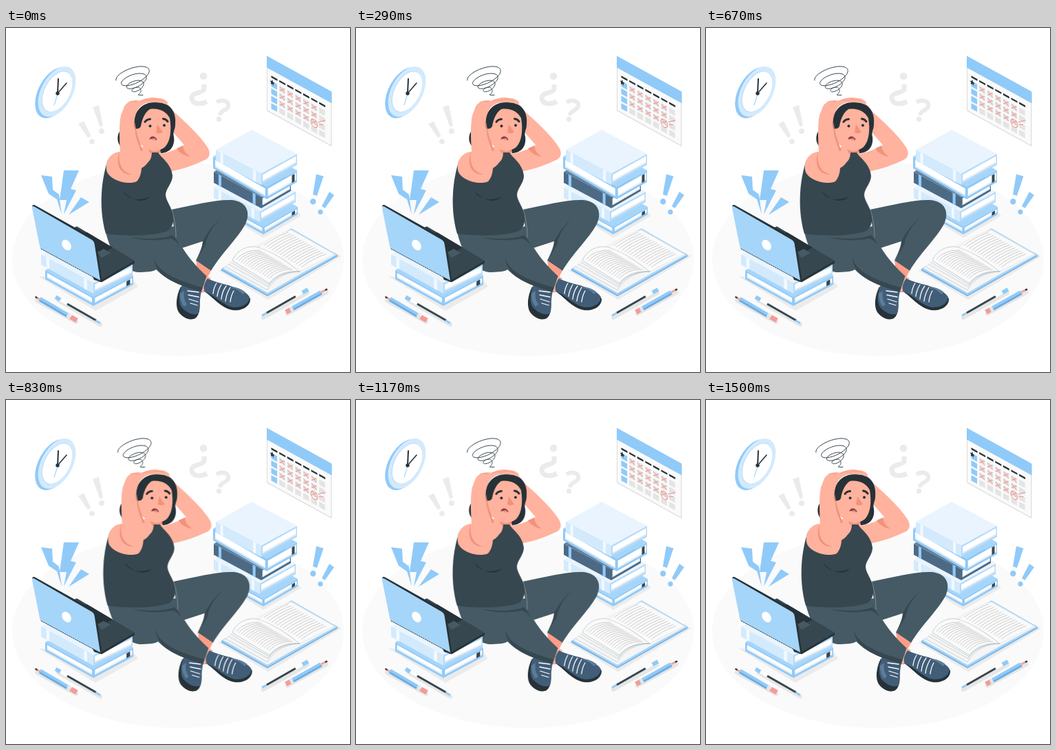
Write an HTML page that moves like this. It is 500 px wide and 500 px high and loops after 1540 ms.

```html
<!DOCTYPE html>
<html lang="en">
<head>
<meta charset="utf-8">
<title>Overwhelmed student</title>
<style>
  html, body { margin: 0; width: 100%; height: 100%; overflow: hidden; background: #fff; }
  svg { display: block; width: 100%; height: 100%; }
  .line { fill: none; stroke-linecap: round; stroke-linejoin: round; }
  .blue { fill: #90caf9; }
  .pale { fill: #d3eafd; }
  .grey { fill: #ebebeb; }
  .shade { fill: #ebebeb; }
  .ink { fill: #263238; }
  .skin { fill: #ffb29d; }
  .blush { fill: #f0937d; }
  .pants { fill: #455a64; }
  .top { fill: #37474f; }
  .shoe { fill: #415d78; }
  #woman {
    animation: shake 1540ms infinite;
    animation-timing-function: cubic-bezier(.36, .07, .19, .97);
  }
  /* the shake takes 1500 ms, then rests until the loop ends */
  @keyframes shake {
    0%, 97.4%, 100% { transform: translateX(0); }
    9.74%, 87.66% { transform: translateX(-1px); }
    19.48%, 77.92% { transform: translateX(2px); }
    29.22%, 48.7%, 68.18% { transform: translateX(-4px); }
    38.96%, 58.44% { transform: translateX(4px); }
  }
</style>
</head>
<body>
<svg viewBox="0 0 500 500">
  <ellipse cx="250" cy="336" rx="241" ry="141" fill="#fafafa"/>

  <g id="clock">
    <g transform="matrix(.83 -.48 0 1 70 94)"><circle r="33.5" class="blue"/></g>
    <g transform="matrix(.83 -.48 0 1 74 92.5)">
      <circle r="33" class="pale"/>
      <circle r="27" fill="#b9ddfb"/>
      <circle cx=".7" cy=".4" r="26.3" fill="#fff"/>
    </g>
    <g class="line" stroke="#263238">
      <path d="M75 95L76 74" stroke-width="2"/>
      <path d="M75 95L88 80" stroke-width="1.6"/>
      <path d="M77 90L70 112" stroke="#90caf9" stroke-width="1"/>
    </g>
    <circle cx="75" cy="95" r="2.700" class="ink"/>
  </g>

  <g class="grey">
    <path d="M105 139.500L113 135.500L123.500 157L119 159.500Z"/><circle cx="125" cy="165" r="3.8"/>
    <path d="M126 115L135 112L141 142L136.500 143.500Z"/><circle cx="139" cy="150" r="4"/>
    <circle cx="287" cy="70" r="5.300"/><circle cx="309.500" cy="132.500" r="3.700"/>
  </g>
  <g class="line" stroke="#ebebeb" style="stroke-linecap:butt">
    <path d="M288 82V89C286 95 271 93 270 101C270 111 282 112 292 107" stroke-width="7"/>
    <path d="M306 108C314 103 325 106 323 114C321 121 312 118 311 127" stroke-width="6"/>
  </g>

  <g class="blue">
    <path d="M51 214L67 216L68 235L77 242L81 271L74 249L62 241Z"/>
    <path d="M84 207H106L94 234L102 236L84 271L88 250L78 250Z"/>
    <path d="M109 246L121 253L91 271.500Z"/>
    <path d="M451 212.500L461.500 215.500L452 244L446 242Z"/><circle cx="446.300" cy="252.300" r="4.200"/>
    <path d="M470 238L477 243L463.500 262L459 259Z"/><circle cx="457" cy="267.300" r="3.600"/>
  </g>

  <g id="calendar" transform="matrix(1 .55 0 1 380 41)">
    <rect x="-1" y=".5" width="94.500" height="79.500" rx="1.500" fill="#dcdcdc"/>
    <rect width="92.300" height="78.500" rx="1" fill="#fafafa"/>
    <path class="blue" d="M-1 1Q-1 0 0 0H92.500Q93.500 0 93.500 1V17H-1Z"/>
    <g id="days"></g>
    <g class="line" stroke="#f0938c" stroke-width="1">
      <ellipse cx="68" cy="60" rx="5" ry="5.500"/><path d="M74 55L84 47M75 58L81 55"/>
    </g>
    <path class="ink" d="M7 30L8 33L10.500 33.300L8.700 35.200L9.200 38L7 36.500L4.800 38L5.300 35.200L3.500 33.300L6 33Z"/>
  </g>

  <path class="shade" d="M304 262L374 305L429 273L420 262Z"/>
  <g id="right-stack"></g>

  <g id="open-book">
    <path class="shade" d="M308 352L381 395L487 332L478 326Z"/>
    <path d="M313 350L415 291.500L482 330V332L380 390L313 352.500Z" fill="#78b4e6"/>
    <path d="M313 350L415 291.500L482 330L380 388Z" fill="#a6d5fa"/>
    <path d="M316 349L368 313L415 293L479 329.500L427 358L380 385Z" fill="#f5f5f5"/>
    <path d="M329 338C336 321 354 315 368 319C390 326 409 341 427 354C408 352 392 359 383 371Z" fill="#fafafa" stroke="#b0bec5" stroke-width=".7"/>
    <path d="M368 319C372 312 390 302 414 293.500L477 328.500L427 354C410 340 390 326 368 319Z" fill="#fafafa" stroke="#cfd8dc" stroke-width=".5"/>
    <path d="M319 347L380 381C388 367 402 355 427 354M323 343L381 376C388 364 404 354 427 354M326 340L382 373C390 361 404 354 427 354" class="line" stroke="#b0bec5" stroke-width=".6"/>
    <g id="print" class="line" stroke="#b8b8b8" stroke-width=".7"></g>
  </g>

  <g id="pencils">
    <path d="M45 396L102 427M76 396L137 431M374 421L438 385M409 415L466 384" class="line" stroke="#e6e6e6" stroke-width="6"/>
    <g id="tools"></g>
  </g>

  <g id="woman">
    <path id="scribble" class="line" stroke="#37474f" stroke-width="1"/>

    <path class="skin" d="M230 108C236 110 239 115 243 121C260 136 280 154 292 172Q300 184 291 191C276 198 258 205 237 209L222 184C238 180 250 176 259 170L240 148Z"/>
    <path d="M248 175Q254 185 268 187Q258 181 257 171Z" class="blush"/>

    <path class="ink" d="M167 148C160 155 161 169 169 174L178 160ZM186 146C184 120 198 107 219 108C238 109 248 120 246 141C246 147 242 151 244 158C246 173 237 183 222 182C208 180 190 168 186 146Z"/>
    <path class="skin" d="M184 180L208 168L224 178L228 190L215 205L195 205Z"/>
    <path d="M206 174Q216 183 225 176L222 184Q210 188 206 174Z" class="blush"/>
    <path class="skin" d="M186 146Q193 148 196 143C198 130 203 122 209 118C222 116 233 121 238 131C241 148 239 165 231 173C223 180 211 179 202 174L190 165Z"/>

    <g class="line" stroke="#263238" stroke-width="3">
      <path d="M202 136.500Q204 133 209.500 132.500M228.500 132Q233 132.500 235 136"/>
    </g>
    <circle cx="209.500" cy="142.500" r="2" class="ink"/><circle cx="230" cy="141.500" r="2" class="ink"/>
    <path d="M220 140L228 151.500Q223 154.500 218 152Z" class="blush"/>
    <path d="M208.500 162C209 156 217 156 219.500 162Q219 164 216 162.500Q212 160.500 208.500 162Z" fill="#8d3f45"/>
    <path d="M212 161.500Q216 158 218.500 162.500Q215 164.500 212 161.500Z" fill="#e58b8b"/>

    <path class="pants" d="M240 264C275 257 305 249 328 250C350 252 356 268 348 285C335 308 315 325 298 353L276 338C282 326 286 315 286 310L249 322Z"/>
    <path d="M286 310Q296 290 312 277Q293 296 290 315L280 333Q286 320 286 310Z" class="top"/>
    <path d="M276 338L298 353L293 362L288 366L270 380L262 374Q281 358 276 338Z" fill="#ff9c85"/>

    <path class="ink" d="M254 376C247 390 246 405 251 413C257 421 267 426 275 422C283 416 282 402 281 393Z"/>
    <path d="M256 373C251 386 250 398 255 406C262 413 272 419 280 415C282 404 281 392 285 379Z" class="shoe"/>
    <path d="M253 386Q253 399 259 405L263 402Q257 393 259 382Z" fill="#5d7c9a"/>
    <path d="M264 382L280 384M265 388L280 391M266 394L279 398M268 400L278 403" class="line" stroke="#fff" stroke-width="1.300"/>

    <path class="pants" d="M145 296C180 299 220 292 245 288C248 312 266 337 292 361L286 384C262 377 230 367 215 347C223 351 217 355 191 355C167 351 151 325 145 296Z"/>
    <path d="M180 304C210 308 230 306 242 301Q249 308 252 316Q246 308 240 306C220 310 198 309 180 304ZM215 332C216 350 240 365 288 378L286 384C258 376 214 364 215 332Z" class="top"/>
    <path class="skin" d="M292 360L298 364L293 372L288 385L284 383Z"/>
    <path d="M241 264Q247 284 247 304" class="line" stroke="#b0bec5" stroke-width=".6" stroke-dasharray="2 1"/>

    <path class="ink" d="M287 382C300 390 312 407 329 410C345 412 356 403 355 393L345 385Z"/>
    <path d="M293 364C288 371 286 378 289 383C304 389 315 403 330 406C344 407 354 400 354 391C349 382 333 378 324 374C312 371 303 369 293 364Z" class="shoe"/>
    <path d="M329 376Q341 378 348 384L344 387Q337 379 328 378Z" fill="#5d7c9a"/>
    <path d="M306 371Q302 377 301 386M313 373Q308 381 307 390M320 375Q314 383 313 394M326 377Q320 387 319 397M331 382Q327 389 326 398" class="line" stroke="#fff" stroke-width="1.300"/>

    <path class="top" d="M148 192C158 205 177 210 190 206C200 204 209 197 211 181L221 181C225 188 241 198 242 215C242 226 232 233 232 243C233 253 242 261 243 275C244 284 241 290 235 295C210 304 165 302 145 299C139 278 138 257 139 240C140 222 144 203 148 192Z"/>
    <path d="M170 237C176 248 192 253 210 245Q193 260 170 237Z" class="ink"/>
    <path class="skin" d="M195 205L212 180Q212 197 197 199Z"/>

    <path class="skin" d="M172 114C176 107 187 103 195 106C204 101 214 100 221 102C230 102 236 107 235 110C224 108 212 107 204 109C192 113 189 122 187 132C185 145 190 163 195 177C199 198 198 215 190 223C177 229 148 221 146 206C144 190 155 180 166 180C165 163 164 141 167 127Z"/>
    <path d="M165 180Q162 200 174 209Q178 212 184 213Q169 214 164 201Q161 190 165 180ZM187 136Q186 156 196 179L199 178Q190 158 187 136Z" class="blush"/>
    <path d="M178 108Q183 105 190 108M195 106Q203 103 210 105M211 104Q221 102 228 106" class="line" stroke="#f0937d" stroke-width=".8"/>
  </g>

  <path class="shade" d="M47 361L130 411L192 376L184 365Z"/>
  <g id="left-stack"></g>

  <g id="laptop">
    <path d="M97 291L103 288.500L187 338.500V341.500L139 369.500L128 366Z" class="ink"/>
    <path d="M98 291L103 288.500L187 338.500L139 366Z" class="top"/>
    <path d="M112 299L118 297L155 319L139 328L130 323Z" class="ink"/>
    <path d="M133 326L142 321L152 327L139 334Z" class="pants"/>
    <path class="ink" d="M38 259Q39 256 42 257.500L127 305Q130 307 131 311L139.500 367L136 369Z"/>
    <path d="M38 262Q38 258 41 259.500L125 308Q128 310 128.500 313L137 367L52 322Q49.500 320 49 317Z" fill="#a6d5fa"/>
    <path d="M51 321L136 367" class="line" stroke="#37474f" stroke-width="1" stroke-dasharray="2 1.500"/>
    <ellipse cx="88" cy="315.500" rx="6" ry="8.400" transform="rotate(-34 88 315.500)" fill="#fff"/>
  </g>
</svg>
<script>
  const byId = id => document.getElementById(id);
  const path = (d, attrs) => `<path d="${d}" ${attrs}/>`;
  const face = (points, fill) => path('M' + points.map(p => p.join(' ')).join('L') + 'Z', `fill="${fill}"`);
  const line = (x, y, dx, dy, color, width) =>
    path(`M${x} ${y}l${dx} ${dy}`, `stroke="${color}" stroke-width="${width}"`);

  const palettes = {
    pale: { top: '#e9f4fe', side: '#d3eafd', edge: '#b4dafa', band: '#f2f9ff' },
    blue: { top: '#a6d5fa', side: '#90caf9', edge: '#90caf9', band: '#37474f' },
    dark: { top: '#64809a', side: '#4d6a85', edge: '#4d6a85', band: '#90caf9' }
  };

  // A lying book: left corner, run to the front corner, run to the right corner, height.
  // With its spine turned away, both visible sides show pages.
  function book(x, y, [sx, sy], [rx, ry], h, tone, spine) {
    const c = palettes[tone];
    const wall = (ox, oy, dx, dy) => (from, to, top, height, fill) => face([
      [ox + dx * from, oy + dy * from + top], [ox + dx * to, oy + dy * to + top],
      [ox + dx * to, oy + dy * to + top + height], [ox + dx * from, oy + dy * from + top + height]
    ], fill);
    const left = wall(x, y, sx, sy), right = wall(x + sx, y + sy, rx, ry);
    const pages = side => side(0, 1, 0, h, c.edge) + side(.04, .97, 2.500, h - 6, '#fff') + side(.04, .97, h - 5.500, 2, '#e6edf2');
    return face([[x, y], [x + rx, y + ry], [x + rx + sx, y + ry + sy], [x + sx, y + sy]], c.top)
      + pages(right)
      + (spine
        ? left(0, 1, 0, h, c.side) + left(.1, .16, 0, h, c.band) + left(.82, .88, 0, h, c.band)
        : pages(left) + right(.83, .92, 3, h - 6, c.band));
  }

  byId('right-stack').innerHTML =
    book(316, 257, [58, 32], [50, -29], 11, 'blue', false) +
    book(302, 232, [67, 35], [52, -29], 15, 'pale', true) +
    book(302, 209, [69, 37], [43, -25], 16, 'dark', true) +
    book(301, 187, [78, 45], [44, -25], 17, 'blue', false) +
    book(305, 177, [66, 35], [52, -29], 16, 'pale', true);

  byId('left-stack').innerHTML =
    book(57, 352, [70, 39], [58, -31], 13, 'blue', false) +
    book(51, 329, [76, 42], [57, -27], 15, 'pale', true);

  let days = '';
  for (let col = 0; col < 7; col++) {
    const x = 5.500 + col * 11.600;
    days += `<rect x="${x}" y="25.300" width="9" height="2.600" class="ink"/>`;
    for (let row = 0; row < 4; row++) {
      const y = 33 + row * 10.700;
      days += `<rect x="${x}" y="${y}" width="8.600" height="8" fill="${col ? '#e4e4e4' : '#90caf9'}"/>`;
      if (col > 0 && col < 6 && row < 3)
        days += path(`M${x + 1} ${y + 1.500}l6.500 5M${x + 7.500} ${y + 1}l-6.500 6`, 'class="line" stroke="#ee8f8a" stroke-width=".9"');
    }
  }
  byId('days').innerHTML = days;

  let print = '';
  for (let i = 0; i < 15; i++) {
    const x = 375 + i * 3.900, y = 316 + i * 2.250;
    print += `<path d="M${x} ${y}Q${x + 14} ${y - 11} ${x + 35} ${y - 19}"/>`;
    const u = 335 + i * 3.400, v = 336 + i * 2;
    print += `<path d="M${u} ${v}Q${u + 12} ${v - 14} ${u + 34} ${v - 13}"/>`;
  }
  byId('print').innerHTML = print;

  // A tilted spiral that shrinks as it sinks towards the head.
  const turns = 3.800, steps = 120, tilt = -.38;
  const spiral = Array.from({ length: steps + 1 }, (_, i) => {
    const p = i / steps, a = Math.PI + p * turns * 2 * Math.PI;
    const u = (27 - 24 * p) * Math.cos(a), v = (10.500 - 7.500 * p) * Math.sin(a);
    const x = 185 + 7 * p + u * Math.cos(tilt) - v * Math.sin(tilt);
    const y = 66 + 28 * p + u * Math.sin(tilt) + v * Math.cos(tilt);
    return `${x.toFixed(1)} ${y.toFixed(1)}`;
  });
  byId('scribble').setAttribute('d', `M${spiral.join('L')}Q193 98 199 97.500`);

  byId('tools').innerHTML =
    line(43, 391, 9, 5, '#f0a59a', 3) + line(42.500, 390.500, 3, 2, '#263238', 2) +
    line(49, 394, 41, 24, '#90caf9', 7) + line(49, 396, 41, 24, '#6fa9dc', 2.500) +
    line(89, 417, 4, 2, '#dfe7ec', 7) + line(94, 420, 9, 5, '#f49b96', 7) +
    line(72, 391, 7, 4, '#90caf9', 5.500) + line(79, 395, 10, 6, '#fff', 4) +
    line(89, 401, 42, 24, '#37474f', 3) + line(130, 425, 7, 4, '#90caf9', 3) +
    line(372, 418, 7, -4, '#90caf9', 3) + line(379, 414, 42, -24, '#37474f', 3) +
    line(421, 390, 10, -6, '#fff', 4) + line(431, 384.500, 8, -4.500, '#90caf9', 6) +
    line(407, 413, 7, -4, '#f49b96', 7) + line(413, 409.500, 4, -2, '#dfe7ec', 7) +
    line(417, 407.500, 41, -23, '#90caf9', 7) + line(418, 409, 41, -23, '#6fa9dc', 2.500) +
    line(458, 384, 8, -4, '#f0a59a', 3) + line(464, 381, 3, -1.500, '#263238', 2);
</script>
</body>
</html>
```
